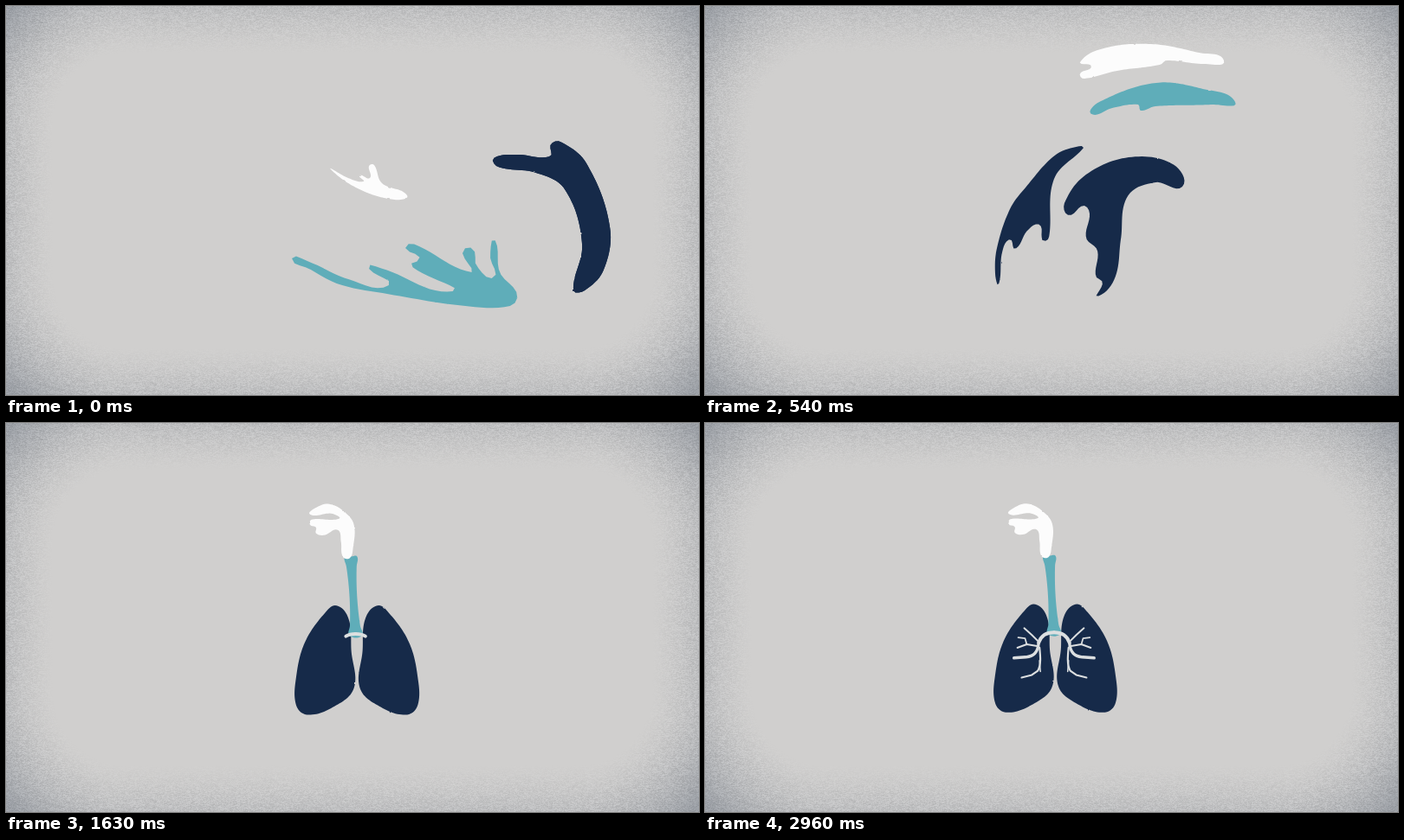
Write an HTML page with a canvas that moves like this. It is 800x450 px and loops after 3 s.

```html
<!DOCTYPE html>
<html lang="en">
<head>
<meta charset="utf-8">
<title>Airways</title>
<style>
  html, body { margin: 0; width: 100%; height: 100%; overflow: hidden; background: #d0cfce; }
  canvas, svg { position: absolute; left: 0; top: 0; width: 800px; height: 450px; }
  #bronchi { fill: none; stroke: #dcdfe0; stroke-linecap: round; stroke-linejoin: round; }
</style>
</head>
<body>
<canvas id="paper" width="800" height="450"></canvas>
<svg viewBox="0 0 800 450">
  <defs>
    <filter id="rough" x="0" y="0" width="800" height="450" filterUnits="userSpaceOnUse" color-interpolation-filters="sRGB">
      <feTurbulence type="fractalNoise" baseFrequency="0.15" numOctaves="1" seed="4" result="n"/>
      <feDisplacementMap in="SourceGraphic" in2="n" scale="2" xChannelSelector="R" yChannelSelector="G"/>
    </filter>
  </defs>
  <g id="scene">
    <g id="bodies" filter="url(#rough)"></g>
    <g id="bronchi"></g>
  </g>
</svg>
<script>
const LOOP = 3000, FPS = 24, FRAMES = 72, SAMPLES = 140;
const NAVY = '#162a49', TEAL = '#5fadb9', WHITE = '#fcfcfc';
const byId = id => document.getElementById(id);
const clamp = v => Math.max(0, Math.min(1, v));
const mix = (a, b, u) => a + (b - a) * u;
const linear = u => u;
const easeOut = u => 1 - (1 - u) ** 2;
const rotate = ([x, y], a) => [x * Math.cos(a) - y * Math.sin(a), x * Math.sin(a) + y * Math.cos(a)];

function add(parent, name, attrs) {
  const el = document.createElementNS('http://www.w3.org/2000/svg', name);
  for (const key in attrs) el.setAttribute(key, attrs[key]);
  return parent.appendChild(el);
}

function points(text) {
  const n = text.split(/\s+/).map(Number);
  return n.filter((_, i) => i % 2 === 0).map((x, i) => [x, n[2 * i + 1]]);
}

// Smooth closed path through key points; handles scale with each segment so it never overshoots.
function smoothPath(pts) {
  const at = i => pts[(i + pts.length) % pts.length];
  const handle = (from, a, b, size) => {
    const k = size / (Math.hypot(b[0] - a[0], b[1] - a[1]) || 1);
    return [from[0] + (b[0] - a[0]) * k, from[1] + (b[1] - a[1]) * k];
  };
  return 'M' + pts[0] + pts.map((p, i) => {
    const next = at(i + 1), size = 0.36 * Math.hypot(next[0] - p[0], next[1] - p[1]);
    return 'C' + [handle(p, at(i - 1), next, size), handle(next, p, at(i + 2), -size), next];
  }).join('');
}

// turn: degrees swept on the way to this pose
function pose(frame, pts, turn = 0, ease = linear) {
  const path = add(byId('bodies'), 'path', { d: smoothPath(pts) });
  const total = path.getTotalLength();
  const ring = Array.from({ length: SAMPLES }, (_, i) => path.getPointAtLength(total * i / SAMPLES));
  path.remove();
  const mean = key => ring.reduce((sum, p) => sum + p[key], 0) / SAMPLES;
  const center = [mean('x'), mean('y')];
  const local = ring.map(p => [p.x - center[0], p.y - center[1]]);
  return { frame, ease, center, local, turn: turn * Math.PI / 180 };
}

// Moves the centre along an arc while the outline turns and morphs.
function blend(a, b, u) {
  const turn = b.turn || 1e-4;
  const chord = [b.center[0] - a.center[0], b.center[1] - a.center[1]];
  const step = rotate(chord, (u - 1) * turn / 2);
  const k = Math.sin(u * turn / 2) / Math.sin(turn / 2);
  return a.local.map((p, i) => {
    const q = rotate(b.local[i], -turn);
    const r = rotate([mix(p[0], q[0], u), mix(p[1], q[1], u)], u * turn);
    return [a.center[0] + step[0] * k + r[0], a.center[1] + step[1] * k + r[1]];
  });
}

// Tube with flared ends; wobble bends and ripples it.
function windpipe(wobble) {
  const side = sign => Array.from({ length: 9 }, (_, i) => {
    const u = i / 8;
    const half = 4.4 + 2.8 * (2 * u - 1) ** 2 + wobble * 0.3 * Math.sin(14 * u);
    return [mix(398.5, 404, u) + wobble * Math.sin(Math.PI * u) + sign * half, mix(155, 247, u)];
  });
  return [[398.5, 155], ...side(1), ...side(-1).reverse()];
}

const leftLung = points('382 212 396 228 399 265 402 308 378 330 348 339 335 328 335 295 345 255 368 221');
const mirrored = leftLung.map(([x, y]) => [811 - x, y]);
const rightLung = [mirrored[0], ...mirrored.slice(1).reverse()];
const navySwirl = [
  pose(0, points('655 329 665 275 645 212 612 193 568 186 563 176 590 172 628 174 629 160 640 157 670 182 697 255 690 305 668 329')),
  pose(5, points('676 237 660 200 641 187 632 193 580 183 520 194 482 204 477 195 516 161 490 157 443 164 440 153 490 138 570 132 635 152 677 215'), -50)
];

const tracks = [
  { color: NAVY, poses: [...navySwirl,
    pose(13, points('437 164 403 200 397 268 390 271 386 253 372 260 358 281 352 270 343 285 339 322 335 310 337 280 352 235 370 210 405 172 433 162'), -76),
    pose(21, leftLung, -30, easeOut)] },
  { color: NAVY, poses: [...navySwirl,
    pose(13, points('551 209 520 204 488 220 480 270 473 315 453 336 459 320 451 312 453 283 440 268 444 240 437 231 420 242 415 228 440 195 490 175 540 183'), -70),
    pose(21, rightLung, -37, easeOut)] },
  { color: TEAL, poses: [
    pose(0, points('330 292 350 296 395 316 442 323 418 302 435 304 515 330 467 300 478 292 461 280 470 275 537 308 527 286 533 279 541 284 543 300 563 314 559 290 564 270 570 308 590 333 582 347 530 347 440 333 385 322 350 304')),
    pose(5, points('616 352 640 321 655 304 676 270 683 225 688 208 681 183 690 179 708 210 715 250 702 293 680 324 677 309 665 316 640 342'), -78),
    pose(13, points('612 111 585 114 520 116 503 121 500 114 470 118 446 125 455 111 520 89 575 96'), -116),
    pose(21, windpipe(5), -86, easeOut),
    pose(27, windpipe(0))] },
  { color: WHITE, poses: [
    pose(0, points('375 189 395 199 413 203 408 196 420 199 419 185 425 184 434 205 463 219 448 224 408 212')),
    pose(5, points('482 241 505 242 560 253 630 251 610 247 536 246 575 241 622 240 641 260 658 265 640 273 590 275 535 266 495 251'), -10),
    pose(13, points('599 63 575 67 533 63 525 68 475 75 437 84 433 78 446 70 433 65 460 49 515 44 570 54'), -185),
    pose(21, points('397 157 389 155 387 138 383 124 368 130 358 128 358 121 351 118 353 112 385 111 376 105 351 106 360 97 374 94 391 103 402 118 401 145'), 40, easeOut)] }
];
for (const track of tracks) track.el = add(byId('bodies'), 'path', { fill: track.color });

// Each twig starts growing once the stem has reached it.
const STEM_START = 36, TWIG_START = 40, GROWTH = 6;
const twigs = [
  { d: 'M404 245C395 245 389 248 386 257', width: 4, start: STEM_START },
  { d: 'M386 257C385 269 380 273 371 274L357 275', width: 3.4 },
  { d: 'M385 255L378 248L369 240', width: 2 },
  { d: 'M384 261L372 259L361 263', width: 2 },
  { d: 'M372 259L370 252L362 251', width: 1.8, start: TWIG_START + 4 },
  { d: 'M387 263C388 273 389 283 385 290L378 295L366 298', width: 2.2 },
  { d: 'M387 278L388 291', width: 1.6, start: TWIG_START + 4 }
];
for (const twig of twigs) {
  twig.els = ['', 'translate(808 0) scale(-1 1)'].map(transform =>
    add(byId('bronchi'), 'path', { d: twig.d, transform, 'stroke-width': twig.width, pathLength: 1 }));
}

function drawTrack({ el, poses }, frame) {
  let i = 0;
  while (i < poses.length - 2 && frame >= poses[i + 1].frame) i++;
  const a = poses[i], b = poses[i + 1];
  const u = b.ease(clamp((frame - a.frame) / (b.frame - a.frame)));
  el.setAttribute('d', 'M' + blend(a, b, u).map(p => p.map(v => v.toFixed(2))).join('L') + 'Z');
}

function drawTwig({ els, start = TWIG_START }, frame) {
  const grown = clamp((frame - start) / GROWTH);
  for (const el of els) {
    el.style.display = grown ? '' : 'none';
    el.setAttribute('stroke-dasharray', grown + ' 2');
  }
}

function render(ms) {
  const frame = Math.floor((ms % LOOP + 5) * FPS / 1000) % FRAMES;
  for (const track of tracks) drawTrack(track, frame);
  for (const twig of twigs) drawTwig(twig, frame);
  const zoom = 1 - 0.015 * clamp((frame - 21) / 50);
  byId('scene').setAttribute('transform', `translate(334 60) scale(${zoom}) translate(-334 -60)`);
}

// Grainy paper that darkens towards a rounded border
function drawPaper() {
  const ctx = byId('paper').getContext('2d');
  const img = ctx.createImageData(800, 450);
  let seed = 7;
  const random = () => (seed = (seed * 1664525 + 1013904223) >>> 0) / 4294967296;
  const base = [208, 207, 206], edge = [155, 159, 165], radius = 110;
  let grain = 0.5;
  for (let y = 0; y < 450; y++) for (let x = 0; x < 800; x++) {
    const qx = Math.max(0, Math.abs(x - 399.5) - 370 + radius);
    const qy = Math.max(0, Math.abs(y - 224.5) - 195 + radius);
    const depth = clamp((Math.hypot(qx, qy) - radius + 25) / 105);
    grain = mix(random(), grain, 0.3);
    const shade = depth ** 1.5, speck = (grain - 0.5) * 90 * depth * (1 - 0.7 * depth);
    const at = (y * 800 + x) * 4;
    base.forEach((c, k) => { img.data[at + k] = mix(c, edge[k], shade) + speck; });
    img.data[at + 3] = 255;
  }
  ctx.putImageData(img, 0, 0);
}

drawPaper();
const start = performance.now();
function tick() {
  render(performance.now() - start);
  requestAnimationFrame(tick);
}
tick();
</script>
</body>
</html>
```
